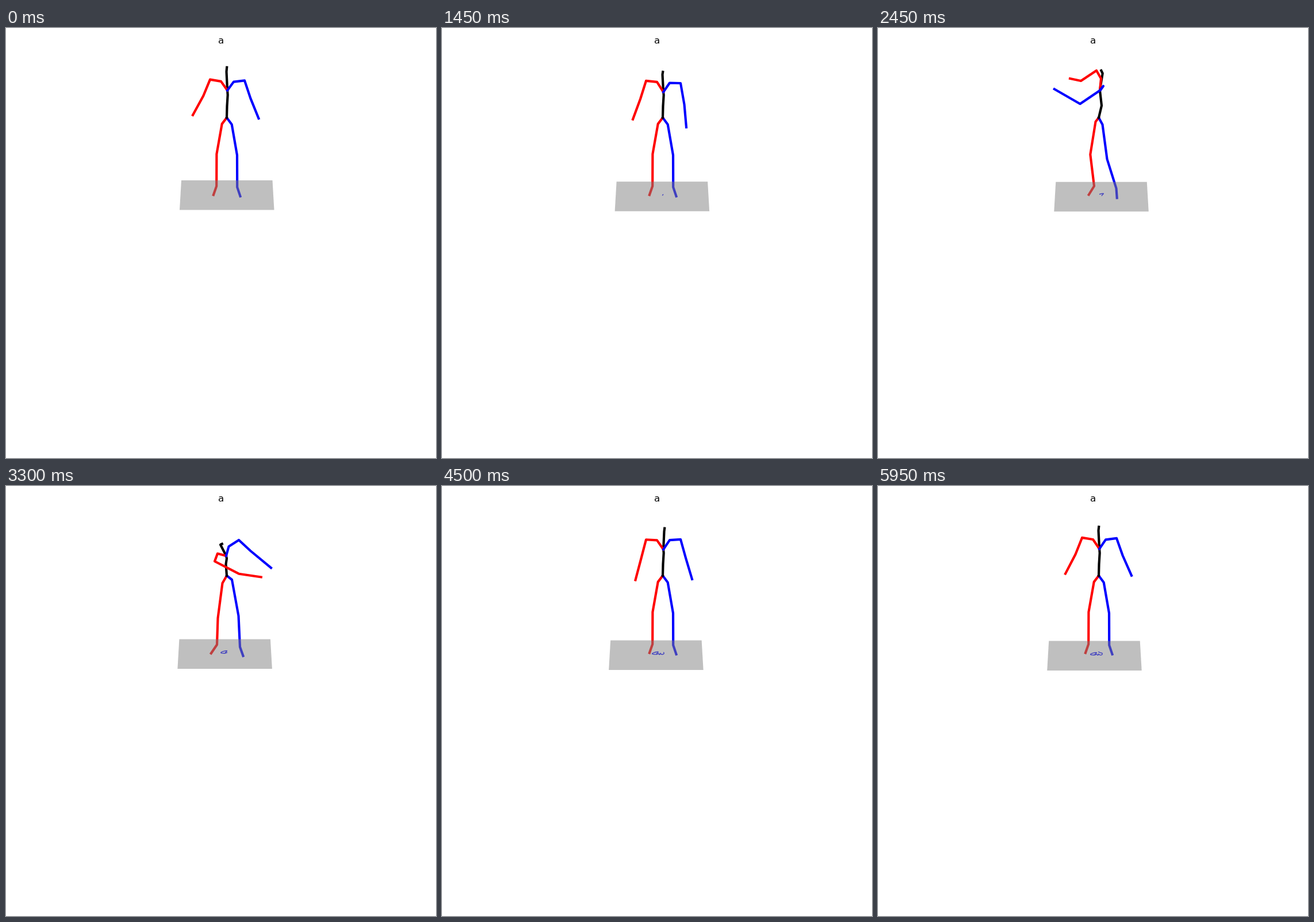
Recreate the animation shown at these times as an HTML page. Size 748 by 748 pixels, loop 6000 ms.

```html
<!DOCTYPE html>
<html lang="en">
<head>
<meta charset="utf-8">
<title>Stick figure swing</title>
<style>
  html, body { margin: 0; width: 100%; height: 100%; overflow: hidden; background: #fff; }
  svg { display: block; width: 748px; height: 748px; }
  polyline { fill: none; stroke-width: 4.17; stroke-linejoin: round; stroke-linecap: square; }
  #trail { stroke: #00f; stroke-width: 1.39; stroke-linecap: butt; }
  #floor { fill: #808080; fill-opacity: .5; }
  text { font: 16.67px "DejaVu Sans", sans-serif; text-anchor: middle; }
</style>
</head>
<body>
<svg viewBox="0 0 748 748">
  <text x="374" y="27">a</text>
  <polyline id="legR" stroke="#f00"/>
  <polyline id="legL" stroke="#00f"/>
  <polyline id="spine" stroke="#000"/>
  <polyline id="armR" stroke="#f00"/>
  <polyline id="armL" stroke="#00f"/>
  <polyline id="trail"/>
  <polygon id="floor"/>
</svg>
<script>
const LOOP = 6000, STEP = 50;
const PELVIS = [384, 156], ROOT_ON_FLOOR = [385, 289.3];
const FLOOR = [[305, 265], [463.5, 265], [466.5, 316.5], [302, 316.5]];
const RIGHT = -1, LEFT = 1;

// Eases between turning points given as [time, value].
const curve = (...keys) => t => {
  const i = keys.findIndex(k => k[0] > t);
  if (i < 0) return keys.at(-1)[1];
  if (i === 0) return keys[0][1];
  const [t0, a] = keys[i - 1], [t1, b] = keys[i];
  const u = (t - t0) / (t1 - t0);
  return a + (b - a) * u * u * (3 - 2 * u);
};

// How far each hand hangs from the body, and how low the head sinks.
const spreadR = curve([0, 60], [350, 66], [1450, 53], [4500, 48.5], [5400, 67], [5950, 59]);
const spreadL = curve([0, 54.5], [350, 57], [1450, 40], [4500, 50], [5400, 61], [5950, 56]);
const droop = curve([0, 0], [1450, 8], [4500, 5], [5950, 2.5]);
const lean = curve([4000, 0], [4500, 3], [5100, 0]);

// Share of each swing pose in the figure.
const windup = curve([1450, 0], [2450, 1], [2650, 1], [3250, 0]);
const follow = curve([2650, 0], [3250, 1], [3350, 1], [4300, 0]);

// Drift of the floor under the figure.
const driftX = curve([1000, 0], [1950, -3], [2750, 7.6], [3300, -3.6],
  [3900, -6.8], [4300, -13], [5050, -6.5], [5950, -7.8]);
const driftY = curve([750, 0], [2100, 4.2], [3050, -.2], [3300, 1.5], [3600, -.6],
  [3850, 1.8], [4100, -.3], [4500, 3.4], [5050, 5.3], [5950, 4.5]);

const WINDUP = {
  spine: [[389, 135], [386.5, 113], [386, 108], [390.7, 79], [388.3, 74]],
  armR: [[388, 88], [380, 74], [353, 92], [334, 88]],
  armL: [[392, 101], [387, 108], [351.5, 132], [306.8, 106.3]],
  legR: [[378.5, 163], [369.3, 220], [376, 275], [366.7, 290]],
  legL: [[390.5, 168], [398.5, 228], [414.5, 279], [415.7, 295.5]]
};
const FOLLOW = {
  spine: [[382.5, 136], [384, 126], [383, 121.5], [373, 102], [375.8, 100.7]],
  armR: [[368, 117.5], [363, 131], [405, 152.7], [443.8, 158.5]],
  armL: [[387.5, 105.3], [405, 94], [425.5, 113], [461, 142.3]],
  legR: [[376.5, 169], [368.5, 230], [367, 276], [356.8, 291]],
  legL: [[393, 163], [404.5, 226], [407, 280], [412.5, 295.5]]
};

// A hanging arm: the wider the hand, the higher the whole arm.
function arm(side, spread) {
  const k = spread - 40;
  return [[11, 95.5 - .13 * k], [30, 96 - .32 * k], [36.5 + .26 * k, 133 - .75 * k], [spread, 172.5 - 1.05 * k]]
    .map(([x, y]) => [385 + side * x, y]);
}

// A standing leg; the left one is a little nearer to the viewer.
const leg = side => [[8.5, 167.3], [17.8, 220.3], [18, 276], [23.3, 291.5]]
  .map(([x, y]) => [384.2 + side * x, y + side * x * .05]);

function standing(t) {
  const d = droop(t), l = lean(t);
  return {
    spine: [[384.5, 136], [385.7, 116.5], [385.1, 108.5 + .37 * d], [383.5 + l, 76 + .62 * d], [384.2 + l, 68.5 + d]],
    armR: arm(RIGHT, spreadR(t)),
    armL: arm(LEFT, spreadL(t)),
    legR: leg(RIGHT),
    legL: leg(LEFT)
  };
}

function pose(t) {
  const body = standing(t), w = windup(t), f = follow(t);
  for (const part in body) {
    body[part] = body[part].map((p, i) => p.map((v, c) =>
      v * (1 - w - f) + w * WINDUP[part][i][c] + f * FOLLOW[part][i][c]));
  }
  return body;
}

const plot = (id, points) => document.getElementById(id)
  .setAttribute("points", points.flat().map(n => n.toFixed(2)).join(" "));

function draw(t) {
  const { spine, armR, armL, legR, legL } = pose(t);
  const chest = spine[2];
  plot("spine", [PELVIS, ...spine]);
  plot("armR", [chest, ...armR]);
  plot("armL", [chest, ...armL]);
  plot("legR", [PELVIS, ...legR]);
  plot("legL", [PELVIS, ...legL]);

  const dx = driftX(t), dy = driftY(t);
  plot("floor", FLOOR.map(([x, y]) => [x + dx, y + dy]));

  // The path walked so far, seen from the current position.
  const trail = [];
  for (let s = 0; s <= t; s += STEP) {
    trail.push([ROOT_ON_FLOOR[0] + dx - driftX(s), ROOT_ON_FLOOR[1] + dy - driftY(s)]);
  }
  plot("trail", trail);
}

const start = performance.now();
function tick() {
  const t = (performance.now() - start) % LOOP;
  draw(Math.floor(t / STEP) * STEP);
  requestAnimationFrame(tick);
}
tick();
</script>
</body>
</html>
```
